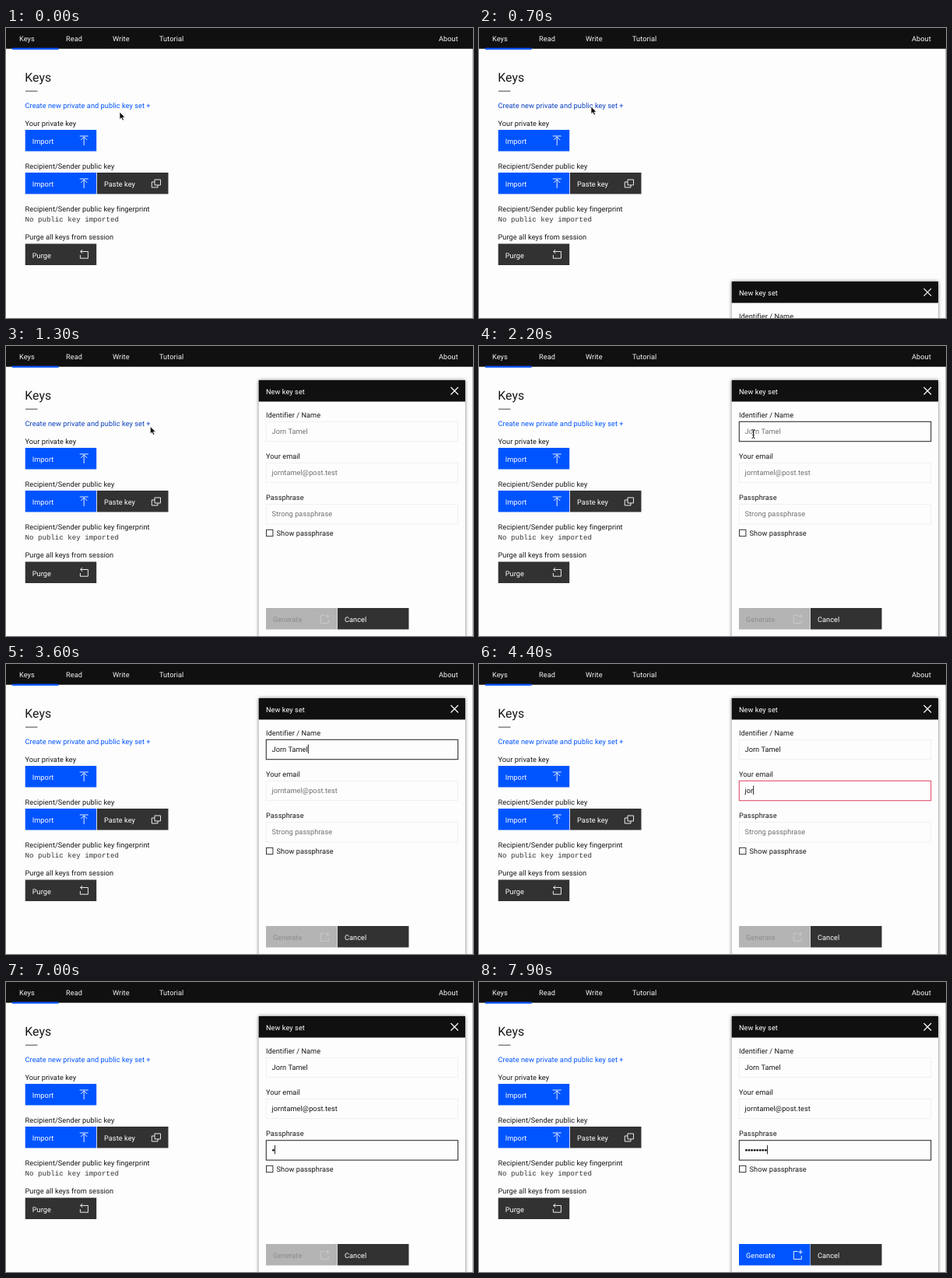
Animation of 600x373 px, one loop 8 s. Source, as an HTML page:

```html
<!DOCTYPE html>
<html lang="en">
<head>
<meta charset="utf-8">
<title>Keys</title>
<style>
  html, body { margin: 0; width: 100%; height: 100%; overflow: hidden; background: #fdfdfd; }
  svg { display: block; width: 600px; height: 373px; }
  text {
    font: 9.2px Roboto, "Open Sans", sans-serif;
    letter-spacing: .06px;
    text-rendering: geometricPrecision;
    white-space: pre;
  }
  .title { font-size: 15.8px; }
  .mono { font: 9.13px "Liberation Mono", "DejaVu Sans Mono", monospace; letter-spacing: 0; }
  .icon { fill: none; stroke: #fff; stroke-width: .9; }
</style>
</head>
<body>
<svg id="stage" viewBox="0 0 600 373"></svg>
<script>
const BLUE = '#0054ff', DARK = '#323232', INK = '#161616';
const NAME = 'Jorn Tamel', EMAIL = 'jorntamel@post.test';
const LOOP = 8000, STEP = 100;

const text = (x, y, str, fill = INK, extra = '') =>
  `<text x="${x}" y="${y}" fill="${fill}" ${extra}>${str}</text>`;
const rect = (x, y, w, h, fill, extra = '') =>
  `<rect x="${x}" y="${y}" width="${w}" height="${h}" fill="${fill}" ${extra}/>`;
const icon = (x, y, d) => `<path class="icon" transform="translate(${x} ${y})" d="${d}"/>`;
const button = (x, y, label, fill, glyph = '') =>
  rect(x, y, 91.5, 27.5, fill) + text(x + 9, y + 18, label, '#fff') +
  (glyph && icon(x + 69.5, y + 7.5, glyph));

const UP = 'M.5 .5H11.5M6 12.5V1.5M2 5.5L6 1.5L10 5.5';
const COPY = 'M4.5 1.5H12V8.5H4.5ZM4.5 4.5H.8V11.5H8.5V8.5';
const RESET = 'M1.5 2.5H11.2V11.2H1.2V7M4 0L1.5 2.5L4 5';
const ADD = 'M6 2H.8V12H10.8V7.5M9.5 0V5.5M6.8 2.8H12.3';

// One form row: label, box, value and hint
const field = (id, y, label, hint) =>
  text(334, y - 5, label) +
  rect(334.3, y + .3, 246.4, 25.4, '#fdfdfd', `id="${id}Box"`) +
  text(341.5, y + 15.8, hint, '#707070', `id="${id}Hint"`) +
  text(341.5, y + 15.8, '', INK, `id="${id}Text"`);

const page =
  rect(0, 0, 600, 373, '#fdfdfd') +
  rect(599.3, 26, .7, 347, '#a8a8a8') +
  rect(0, 0, 600, 26.7, '#101010') +
  rect(8, 25.6, 59.5, 2.2, BLUE) +
  [[17, 'Keys'], [77, 'Read'], [137, 'Write'], [197, 'Tutorial'], [556, 'About']]
    .map(([x, s]) => text(x, 17, s, '#f4f4f4')).join('') +
  text(24.3, 69, 'Keys', INK, 'class="title"') +
  rect(25, 80.7, 15.5, .9, '#333') +
  text(24.5, 102.8, 'Create new private and public key set +', BLUE, 'id="link"') +
  text(24.5, 125.7, 'Your private key') +
  button(24.7, 131, 'Import', BLUE, UP) +
  text(24.5, 180.7, 'Recipient/Sender public key') +
  button(24.7, 186, 'Import', BLUE, UP) +
  button(117, 186, 'Paste key', DARK, COPY) +
  text(24.5, 235.6, 'Recipient/Sender public key fingerprint') +
  text(24.5, 249, 'No public key imported', '#333', 'class="mono"') +
  text(24.5, 272, 'Purge all keys from session') +
  button(24.7, 277.5, 'Purge', DARK, RESET);

const panel = `<g id="panel">` +
  rect(324.7, 44, 265.3, 400, '#fdfdfd', 'style="filter:drop-shadow(0 0 2px rgba(0,0,0,.55))"') +
  rect(324.7, 44, 265.3, 27.5, '#101010') +
  text(334, 61.8, 'New key set', '#fff') +
  `<path d="M571.5 53L581 62.5M581 53L571.5 62.5" stroke="#fff" stroke-width="1.2"/>` +
  field('name', 97, 'Identifier / Name', NAME) +
  field('mail', 150, 'Your email', EMAIL) +
  field('pass', 203.4, 'Passphrase', 'Strong passphrase') +
  `<g id="dots" fill="${INK}"></g>` +
  rect(334.5, 236.3, 8.4, 8.4, 'none', 'stroke="#222" stroke-width=".9"') +
  text(347.5, 243.6, 'Show passphrase') +
  rect(334, 337, 91.5, 27.5, '#b4b4b4', 'id="genBox"') +
  text(343, 355, 'Generate', '#8c8c8c', 'id="genText"') +
  `<g id="genIcon">${icon(403.5, 344.5, ADD)}</g>` +
  button(426, 337, 'Cancel', DARK) +
  rect(0, 0, .9, 11.5, '#111', 'id="caret"') + `</g>`;

const pointers =
  `<path id="arrow" d="M0 0V9.6L2.2 7.6L3.8 11L5.5 10.2L4 7H7Z" fill="#111" stroke="#fff" stroke-width=".7"/>` +
  `<path id="beam" d="M-2 -5.5Q0 -5.5 0 -4Q0 -5.5 2 -5.5M0 -4V4M-2 5.5Q0 5.5 0 4Q0 5.5 2 5.5M-1.2 1.5H1.2" fill="none" stroke="#222"/>`;

document.getElementById('stage').innerHTML = page + panel + pointers;

const el = id => document.getElementById(id);
const set = (id, attrs) => { for (const k in attrs) el(id).setAttribute(k, attrs[k]); };
const show = (id, on) => set(id, { visibility: on ? 'visible' : 'hidden' });
const clamp = v => Math.max(0, Math.min(1, v));
const span = (t, a, b) => clamp((t - a) / (b - a));
const ease = p => p * p * (3 - 2 * p);
const mix = (a, b, p) => a + (b - a) * p;
const blend = (a, b, p) => `rgb(${a.map((v, i) => Math.round(mix(v, b[i], p)))})`;
// Characters typed by time t, one every gap ms
const typed = (t, start, gap, max) =>
  t < start ? 0 : Math.min(max, 1 + Math.floor((t - start) / gap));

function fill(id, value, count, stroke, width) {
  el(id + 'Text').textContent = value;
  show(id + 'Hint', !count);
  set(id + 'Box', { stroke, 'stroke-width': width });
}

function movePointer(t) {
  const a = ease(span(t, 100, 500)), b = ease(span(t, 1100, 1800));
  const x = mix(mix(146, 144, a), 352.5, b);
  const y = mix(mix(108, 101, a), 113, b);
  const overField = x > 334;
  const at = { transform: `translate(${x} ${y})` };
  set('arrow', at);
  set('beam', at);
  show('arrow', !overField);
  show('beam', overField && t < 2400);
  set('link', { fill: x < 186 && y < 104 ? '#0b3fc0' : BLUE });
}

function draw(t) {
  movePointer(t);

  const slide = 329 * (1 - span(t, 680, 1080)) ** 3;
  set('panel', { transform: `translate(0 ${slide})` });
  show('panel', t >= 700);

  const n = typed(t, 2400, 88, NAME.length);
  const m = typed(t, 4100, 122, EMAIL.length);
  const p = typed(t, 7000, 120, 8);
  const focus = t < 1800 ? '' : t < 3900 ? 'name' : t < 6600 ? 'mail' : 'pass';
  const badMail = m > 0 && m < EMAIL.length;
  const edge = id => id === focus ? '#333' : '#ebebeb';
  const width = id => id === focus ? 1.1 : .7;

  fill('name', NAME.slice(0, n), n, edge('name'), width('name'));
  fill('mail', EMAIL.slice(0, m), m, badMail ? '#e0506c' : edge('mail'), width('mail'));
  fill('pass', '', p, edge('pass'), width('pass'));

  let dots = '';
  for (let i = 0; i < p; i++) dots += `<circle cx="${343.4 + i * 3.57}" cy="216.3" r="1.4"/>`;
  el('dots').innerHTML = dots;

  const typing = { name: n, mail: m, pass: p }[focus];
  const advance = focus === 'pass' ? p * 3.57
    : typing ? el(focus + 'Text').getComputedTextLength() : 0;
  const top = { name: 103.5, mail: 156.5, pass: 209.8 }[focus] || 0;
  set('caret', { x: 341.5 + advance, y: top });
  show('caret', focus && t >= 700 && !(t >= 2200 && t < 2400));

  const on = span(t, 7000, 7200);
  set('genBox', { fill: blend([180, 180, 180], [0, 84, 255], on) });
  set('genText', { fill: blend([140, 140, 140], [255, 255, 255], on) });
  set('genIcon', { opacity: mix(.3, 1, on) });
}

const begin = performance.now();
function tick() {
  const t = (performance.now() - begin) % LOOP;
  draw(Math.floor(t / STEP) * STEP);
  requestAnimationFrame(tick);
}
tick();
</script>
</body>
</html>
```
